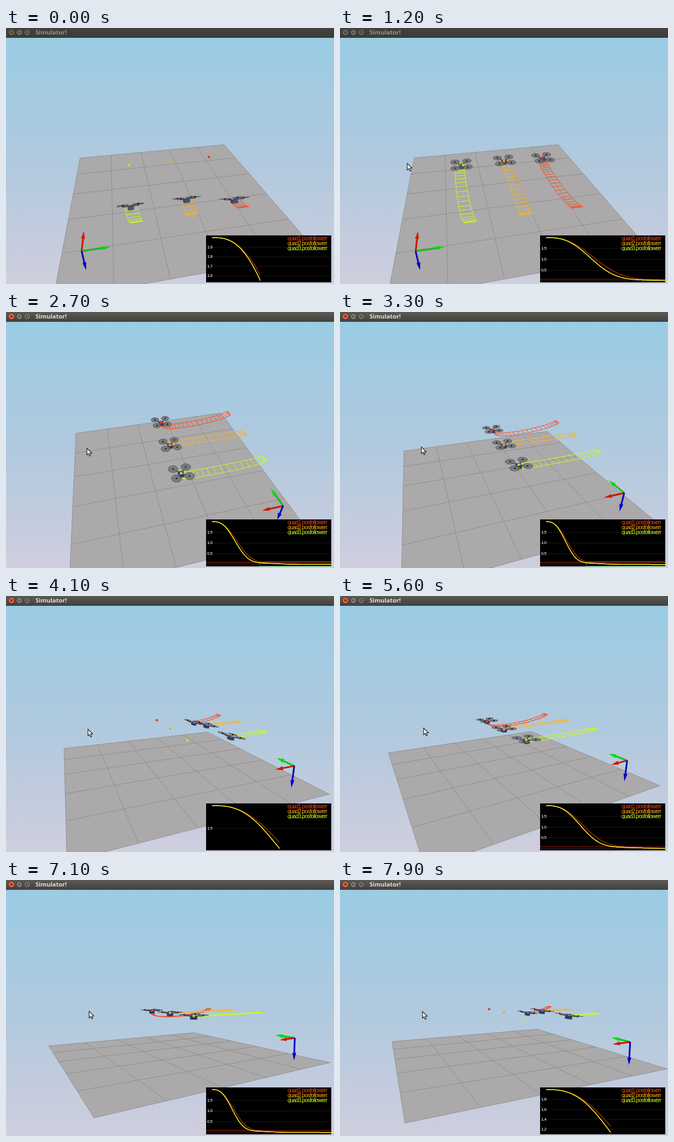
An HTML page with a canvas for the animation above (8 s loop, 600 by 469 pixels).

```html
<!DOCTYPE html>
<html lang="en">
<head>
<meta charset="utf-8">
<title>Simulator!</title>
<style>
html, body { margin: 0; width: 100%; height: 100%; overflow: hidden; background: #b4c8da; }
canvas { display: block; width: 600px; height: 469px; }
</style>
</head>
<body>
<canvas id="stage" width="600" height="469"></canvas>
<script>
const ctx = document.getElementById('stage').getContext('2d');
const LOOP = 8000, FOCAL = 483, DIST = 6.47, CX = 300, CY = 243.5;
const RATE = 0.2;                  // plot units per ms
const RUNS = [-440, 3485, 7310];   // start time of each flight

// time, azimuth, elevation of the camera around the middle goal
const CAMERA = [
  [0, -11.5, 29.6], [1400, -11.5, 29.6], [1900, -42, 40], [2650, -104, 39.2],
  [2750, -104, 39.2], [3650, -111, 18], [4100, -111.6, 15.1], [4500, -115, 15],
  [5600, -118, 14.9], [6400, -126.4, 0.6], [6550, -126.4, 0.6],
  [7300, -118, 5.5], [7900, -114.5, 6.67], [8000, -114.5, 6.67]
];
const CURSOR = [
  [850, 12, 320], [1150, 123, 248], [1400, 123, 248], [2650, 148, 250],
  [4100, 150, 244], [5600, 153, 242], [6400, 153, 240], [7900, 151, 241], [8000, 151, 241]
];
// lane offset, colours, sideways drift, dip, time constants
const QUADS = [
  { lane: 1, color: '#ff4a1c', ball: '#f03010', drift: 0, dip: 0.24, b: 156, n: 2.6 },
  { lane: 0, color: '#ffb41e', ball: '#f0a818', drift: 0.02, dip: 0, b: 143, n: 2.75 },
  { lane: -1, color: '#c8ff14', ball: '#c8e818', drift: -0.1, dip: 0, b: 143, n: 2.75 }
];

function track(keys, t) {
  let i = 1;
  while (i < keys.length - 1 && t > keys[i][0]) i++;
  const a = keys[i - 1], b = keys[i];
  const k = Math.min(1, Math.max(0, (t - a[0]) / (b[0] - a[0])));
  return [a[1] + (b[1] - a[1]) * k, a[2] + (b[2] - a[2]) * k];
}

let view;
function setCamera(t) {
  const [az, el] = track(CAMERA, t).map(d => d * Math.PI / 180);
  view = { ca: Math.cos(az), sa: Math.sin(az), ce: Math.cos(el), se: Math.sin(el) };
}

// north, east, up relative to the middle goal -> screen
function project([n, e, u]) {
  const fwd = n * view.ca - e * view.sa;
  const right = n * view.sa + e * view.ca;
  const s = FOCAL / (DIST + fwd * view.ce - u * view.se);
  return [CX + right * s, CY - (fwd * view.se + u * view.ce) * s];
}

function path(points, closed) {
  ctx.beginPath();
  points.forEach(([x, y], i) => i ? ctx.lineTo(x, y) : ctx.moveTo(x, y));
  if (closed) ctx.closePath();
}
function stroke(points, color, width) {
  path(points);
  ctx.strokeStyle = color;
  ctx.lineWidth = width;
  ctx.stroke();
}
function fill(points, color) {
  path(points, true);
  ctx.fillStyle = color;
  ctx.fill();
}
function dot([x, y], r, color) {
  ctx.beginPath();
  ctx.arc(x, y, r, 0, 7);
  ctx.fillStyle = color;
  ctx.fill();
}
const line3 = (a, b, color, width) => stroke([project(a), project(b)], color, width);

function drawSky() {
  const g = ctx.createLinearGradient(0, 18, 0, 469);
  g.addColorStop(0, '#9acce4');
  g.addColorStop(0.5, '#b0c9de');
  g.addColorStop(1, '#cfcede');
  ctx.fillStyle = g;
  ctx.fillRect(0, 0, 600, 469);
}

function drawFloor() {
  const h = 2.5;
  fill([[h, -h, -1], [h, h, -1], [-h, h, -1], [-h, -h, -1]].map(project), '#aba9aa');
  for (let i = -h; i <= h; i++) {
    line3([i, -h, -1], [i, h, -1], '#8d8d8e', 0.9);
    line3([-h, i, -1], [h, i, -1], '#8d8d8e', 0.9);
  }
}

function arrow(from, to, color, edge) {
  const a = project(from), b = project(to);
  const dx = b[0] - a[0], dy = b[1] - a[1], len = Math.hypot(dx, dy) || 1;
  const ux = dx / len, uy = dy / len, head = Math.min(14, len * 0.45);
  const base = [b[0] - ux * head, b[1] - uy * head];
  stroke([a, base], edge, 3);
  stroke([a, base], color, 1.8);
  fill([b, [base[0] - uy * 3.6, base[1] + ux * 3.6], [base[0] + uy * 3.6, base[1] - ux * 3.6]], color);
}

function drawAxes() {
  const o = [-2, -2, -0.5];
  arrow(o, [-2, -1.5, -0.5], '#00dc0a', '#009a0a');
  arrow(o, [-1.5, -2, -0.5], '#d21c00', '#a01400');
  arrow(o, [-2, -2, -1], '#0000d2', '#000096');
}

const decay = (x, b, n) => Math.exp(-Math.pow(x / b, n));
const rise = (x, scale) => 1 - decay(x, scale, 2);

function place(q, tau) {
  return [
    -2 * decay(tau, q.b, q.n),
    q.lane + q.drift * rise(tau, 80) * decay(tau, 330, 4),
    -q.dip * rise(tau, 105) * decay(tau, 280, 4)
  ];
}

function drawTrail(q, tau) {
  const end = Math.min(tau, 420), half = 0.11;
  const side = (x, s) => { const p = place(q, x); p[1] += s * half; return project(p); };
  for (const s of [-1, 1]) {
    const rail = [];
    for (let x = 0; x < end; x += 4) rail.push(side(x, s));
    rail.push(side(end, s));
    stroke(rail, q.color, 1);
  }
  for (let x = 0; x < end; x += 11) stroke([side(x, -1), side(x, 1)], q.color, 1);
}

// nose down while speeding up, nose up while braking
const pitchAt = tau =>
  (26 * Math.exp(-Math.pow((tau - 150) / 40, 2)) - 46 * Math.exp(-Math.pow((tau - 75) / 30, 2))) * Math.PI / 180;

function drawQuad(q, tau) {
  const c = place(q, tau);
  const pitch = pitchAt(tau), cp = Math.cos(pitch), sp = Math.sin(pitch);
  const at = (f, r, u) => project([c[0] + f * cp - u * sp, c[1] + r, c[2] + f * sp + u * cp]);
  const arm = 0.145;
  const corners = [[arm, -arm], [arm, arm], [-arm, arm], [-arm, -arm]];
  const square = (s, u) => [[s, -s], [s, s], [-s, s], [-s, -s]].map(([f, r]) => at(f, r, u));

  const top = square(0.055, 0.005), low = square(0.055, -0.075);
  fill(low, '#23283e');
  for (let i = 0; i < 4; i++) {
    const j = (i + 1) % 4;
    fill([top[i], top[j], low[j], low[i]], i % 2 ? '#343a60' : '#4a5070');
  }
  for (const [f, r] of corners) {
    stroke([at(0, 0, 0), at(f, r, 0)], '#3c3e4a', 1.5);
    const disc = [];
    for (let k = 0; k < 20; k++) {
      const a = k * Math.PI / 10;
      disc.push(at(f + 0.107 * Math.cos(a), r + 0.107 * Math.sin(a), 0.02));
    }
    fill(disc, 'rgba(112,114,119,0.85)');
    ctx.strokeStyle = '#54565f';
    ctx.lineWidth = 0.8;
    ctx.stroke();
    dot(at(f, r, 0.02), 1.3, '#16161c');
  }
  fill(top, '#3d4468');
  stroke([at(0.05, 0.03, 0.01), at(-0.05, 0.03, 0.01)], '#2a3cc0', 1.4);
  stroke([at(0.05, -0.03, 0.01), at(-0.05, -0.03, 0.01)], '#b9bcc6', 1);
}

const error = (q, x) => 2 * decay(x, q.b, q.n) + 0.1 * rise(x, 200) * decay(x, 350, 4);

function drawPlot(tau, boxed) {
  const L = 366, T = 380, W = 229, H = 86, X0 = 377, SPAN = 218;
  ctx.save();
  ctx.beginPath();
  ctx.rect(L, T, W, H);
  ctx.clip();
  ctx.fillStyle = '#000';
  ctx.fillRect(L, T, W, H);

  const range = Math.max(0.02, 2 - error(QUADS[1], tau));
  const yOf = v => 384 + (2 - v) * 78.5 / range;
  const xOf = x => X0 + x * SPAN / Math.max(SPAN, tau);
  const step = range < 0.12 ? 0.02 : range < 0.5 ? 0.1 : range < 0.91 ? 0.2 : 0.5;

  ctx.font = '8px "Liberation Sans", Arial, sans-serif';
  ctx.textAlign = 'left';
  ctx.textBaseline = 'middle';
  ctx.letterSpacing = '-0.6px';
  for (let v = 2 - step; yOf(v) < 458; v -= step) {
    const y = yOf(v);
    if (y < 392) continue;
    stroke([[L, y], [L + W, y]], '#191919', 1);
    ctx.fillStyle = '#fff';
    ctx.fillText(v.toFixed(step < 0.1 ? 2 : 1), 368, y);
  }
  if (range > 1.6) {
    stroke([[L, yOf(0.1)], [L + W, yOf(0.1)]], '#92200e', 1.1);
    stroke([[L, yOf(0.02)], [L + W, yOf(0.02)]], '#4a3030', 0.8);
  }
  if (boxed) {
    ctx.strokeStyle = '#0c8a22';
    ctx.lineWidth = 1;
    ctx.strokeRect(xOf(250) + 0.5, 457.5, 160, 8);
  }
  QUADS.forEach((q, i) => {
    const pts = [];
    for (let k = 0; k <= 120; k++) {
      const x = tau * k / 120;
      pts.push([xOf(x), yOf(error(q, x))]);
    }
    stroke(pts, ['#b8330f', '#ffa814', '#faff28'][i], 1.25);
  });

  ctx.font = '10px "Liberation Sans", Arial, sans-serif';
  ctx.letterSpacing = '-0.67px';
  ['#ff4014', '#ffb014', '#d2ff14'].forEach((c, i) => {
    ctx.fillStyle = c;
    ctx.fillText(`quad${i + 1}.posfollowerr`, 515, 386 + i * 9);
  });
  ctx.restore();
}

function drawTitle(active) {
  const g = ctx.createLinearGradient(0, 0, 0, 18);
  g.addColorStop(0, active ? '#5c5a53' : '#44423e');
  g.addColorStop(1, active ? '#413f3b' : '#3b3a36');
  ctx.fillStyle = g;
  ctx.fillRect(0, 0, 600, 18);
  [10, 24.5, 39].forEach((x, i) => {
    const hot = active && i === 0;
    dot([x, 8], 6, '#34322e');
    dot([x, 8], 5.2, hot ? '#ee6540' : active ? '#7b7971' : '#6a6861');
    const ink = hot ? '#5a2010' : '#3a3834';
    if (i === 0) {
      stroke([[x - 2, 6], [x + 2, 10]], ink, 1.2);
      stroke([[x + 2, 6], [x - 2, 10]], ink, 1.2);
    } else if (i === 1) {
      stroke([[x - 2.5, 8], [x + 2.5, 8]], ink, 1.2);
    } else {
      ctx.lineWidth = 1.1;
      ctx.strokeStyle = ink;
      ctx.strokeRect(x - 2, 6, 4, 4);
    }
  });
  ctx.font = '700 11px "Open Sans", "Noto Sans", sans-serif';
  ctx.textAlign = 'left';
  ctx.textBaseline = 'alphabetic';
  ctx.fillStyle = active ? '#e2dfd6' : '#95928a';
  ctx.fillText('Simulator!', 54, 12);
}

function drawCursor(t) {
  if (t < CURSOR[0][0]) return;
  const [x, y] = track(CURSOR, t);
  const shape = [[0, 0], [0, 12], [2.8, 9.6], [4.8, 14], [6.8, 13.1], [4.9, 8.8], [8.6, 8.6]];
  fill(shape.map(p => [x + p[0], y + p[1]]), '#fff');
  ctx.strokeStyle = '#111';
  ctx.lineWidth = 1.1;
  ctx.stroke();
}

function draw(t) {
  const start = RUNS.filter(s => s <= t).pop();
  const tau = (t - start) * RATE;
  setCamera(t);
  drawSky();
  drawFloor();
  drawAxes();
  QUADS.forEach(q => drawTrail(q, tau));
  QUADS.forEach(q => {
    drawQuad(q, tau);
    dot(project([0, q.lane, 0]), 2.2, q.ball);
  });
  drawPlot(tau, start < 0 && t > 2300);
  drawTitle(t > 1450);
  drawCursor(t);
}

function frame(now) {
  draw(now % LOOP);
  requestAnimationFrame(frame);
}
draw(0);
requestAnimationFrame(frame);
</script>
</body>
</html>
```
